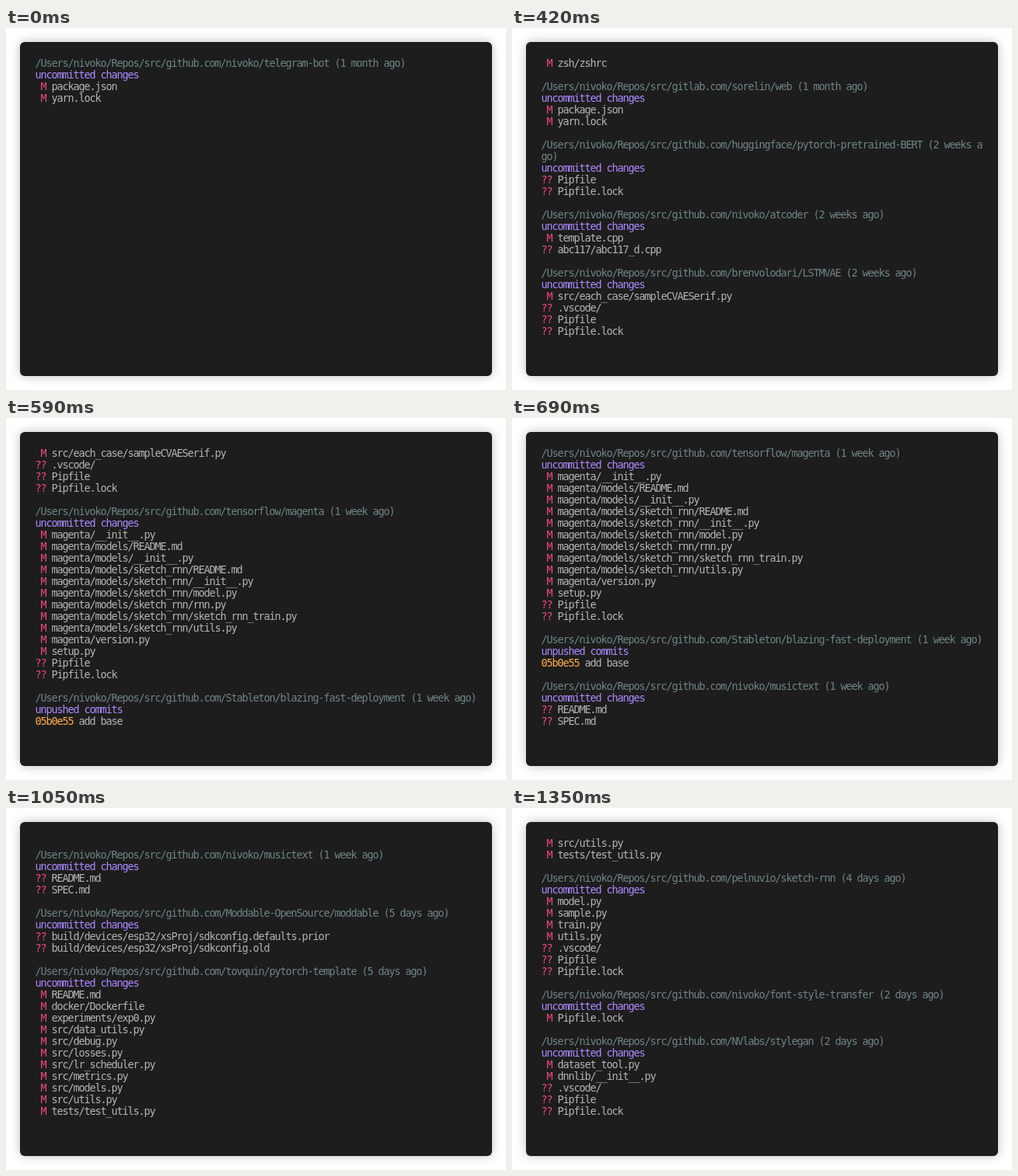
These frames come from a looping animation (643x466 px, 2.21 s). An HTML page with a canvas:

```html
<!DOCTYPE html>
<html lang="en">
<head>
<meta charset="utf-8">
<title>Repository status</title>
<style>
  html, body { margin: 0; width: 100%; height: 100%; overflow: hidden; background: #fff; }
  canvas {
    position: absolute; left: 18px; top: 18px;
    border-radius: 6px; background: #1d1d1d;
    box-shadow: 0 0 14px rgba(0, 0, 0, .25);
  }
</style>
</head>
<body>
<canvas width="607" height="430"></canvas>
<script>
const LOOP = 2210, COLS = 81, ROWS = 24, CELL_W = 7, CELL_H = 15, PAD = 20;
const GRAY = '#708387', PURPLE = '#ae89fe', PINK = '#f24a82', ORANGE = '#ffac50', TEXT = '#b4b4b4';

const root = '/Users/nivoko/Repos/src';
const repos = `${root}/github.com/nivoko/telegram-bot (1 month ago)
uncommitted changes
 M package.json
 M yarn.lock

${root}/github.com/nivoko/dotfiles (1 month ago)
uncommitted changes
 M zsh/zshrc

${root}/gitlab.com/sorelin/web (1 month ago)
uncommitted changes
 M package.json
 M yarn.lock

${root}/github.com/huggingface/pytorch-pretrained-BERT (2 weeks ago)
uncommitted changes
?? Pipfile
?? Pipfile.lock

${root}/github.com/nivoko/atcoder (2 weeks ago)
uncommitted changes
 M template.cpp
?? abc117/abc117_d.cpp

${root}/github.com/brenvolodari/LSTMVAE (2 weeks ago)
uncommitted changes
 M src/each_case/sampleCVAESerif.py
?? .vscode/
?? Pipfile
?? Pipfile.lock

${root}/github.com/tensorflow/magenta (1 week ago)
uncommitted changes
 M magenta/__init__.py
 M magenta/models/README.md
 M magenta/models/__init__.py
 M magenta/models/sketch_rnn/README.md
 M magenta/models/sketch_rnn/__init__.py
 M magenta/models/sketch_rnn/model.py
 M magenta/models/sketch_rnn/rnn.py
 M magenta/models/sketch_rnn/sketch_rnn_train.py
 M magenta/models/sketch_rnn/utils.py
 M magenta/version.py
 M setup.py
?? Pipfile
?? Pipfile.lock

${root}/github.com/Stableton/blazing-fast-deployment (1 week ago)
unpushed commits
05b0e55 add base

${root}/github.com/nivoko/musictext (1 week ago)
uncommitted changes
?? README.md
?? SPEC.md

${root}/github.com/Moddable-OpenSource/moddable (5 days ago)
uncommitted changes
?? build/devices/esp32/xsProj/sdkconfig.defaults.prior
?? build/devices/esp32/xsProj/sdkconfig.old

${root}/github.com/tovquin/pytorch-template (5 days ago)
uncommitted changes
 M README.md
 M docker/Dockerfile
 M experiments/exp0.py
 M src/data_utils.py
 M src/debug.py
 M src/losses.py
 M src/lr_scheduler.py
 M src/metrics.py
 M src/models.py
 M src/utils.py
 M tests/test_utils.py

${root}/github.com/pelnuvio/sketch-rnn (4 days ago)
uncommitted changes
 M model.py
 M sample.py
 M train.py
 M utils.py
?? .vscode/
?? Pipfile
?? Pipfile.lock

${root}/github.com/nivoko/font-style-transfer (2 days ago)
uncommitted changes
 M Pipfile.lock

${root}/github.com/NVlabs/stylegan (2 days ago)
uncommitted changes
 M dataset_tool.py
 M dnnlib/__init__.py
?? .vscode/
?? Pipfile
?? Pipfile.lock`.split('\n\n');

// Time at which each repository is printed
const printTimes = [0, 100, 160, 220, 320, 420, 490, 590, 690, 950, 1050, 1150, 1250, 1350];

// Terminal rows, each a list of [text, colour] spans
function layout(line) {
  if (line.startsWith('/')) {
    const rows = [];
    for (let i = 0; i < line.length; i += COLS) rows.push([[line.slice(i, i + COLS), GRAY]]);
    return rows;
  }
  if (line.startsWith('un')) return [[[line, PURPLE]]];
  const [, status, rest] = line.match(/^( M|\?\?|[0-9a-f]{7})(.*)/);
  return [[[status, status.length > 2 ? ORANGE : PINK], [rest, TEXT]]];
}

const log = [], rowCounts = [];
for (const repo of repos) {
  if (log.length) log.push([]);
  log.push(...repo.split('\n').flatMap(layout));
  rowCounts.push(log.length);
}

const canvas = document.querySelector('canvas');
const ctx = canvas.getContext('2d');
ctx.font = '13.5px "DejaVu Sans Mono", monospace';
ctx.textAlign = 'center';

function draw(printed) {
  const end = rowCounts[printed - 1];
  ctx.clearRect(0, 0, canvas.width, canvas.height);
  log.slice(Math.max(0, end - ROWS), end).forEach((spans, row) => {
    let x = PAD + CELL_W / 2;
    for (const [text, color] of spans) {
      ctx.fillStyle = color;
      for (const char of text) {
        ctx.fillText(char, x, PAD + 12 + row * CELL_H);
        x += CELL_W;
      }
    }
  });
}

let shown = 0;
function tick() {
  const time = performance.now() % LOOP;
  const printed = printTimes.filter(t => t <= time).length;
  if (printed !== shown) draw(shown = printed);
  requestAnimationFrame(tick);
}
tick();
</script>
</body>
</html>
```
